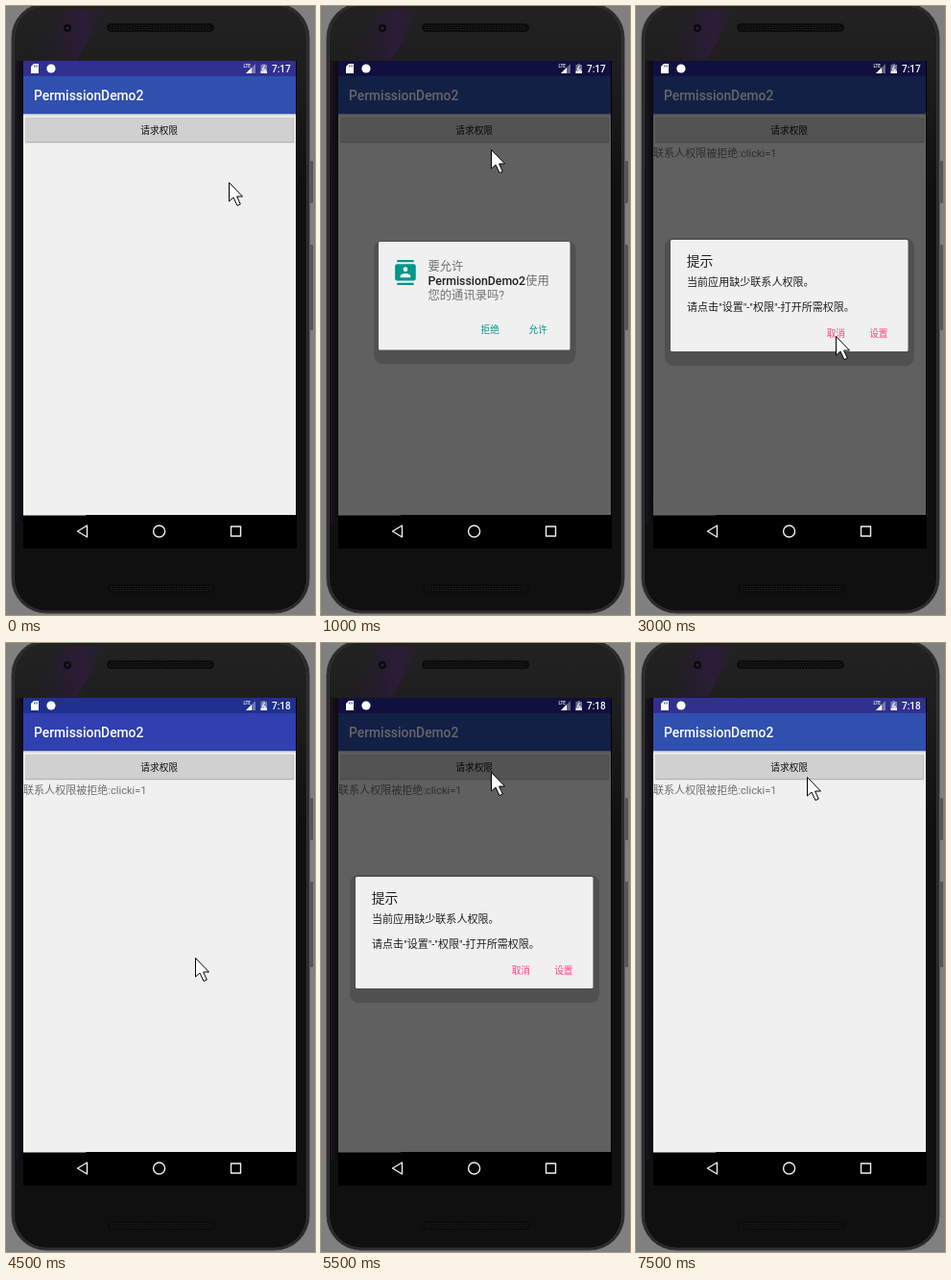
Write an HTML page that moves like this. It is 322 px wide and 633 px high and loops after 8000 ms.

```html
<!DOCTYPE html>
<html lang="zh-CN">
<head>
<meta charset="utf-8">
<style>
html, body { margin: 0; width: 100%; height: 100%; overflow: hidden; background: #808080; }
svg { display: block; width: 322px; height: 633px; }
text { font-family: Roboto, "Noto Sans CJK SC", "Noto Sans CJK", sans-serif; font-size: 11.06px; }
.small { font-size: 9.7px; }
.big { font-size: 13.85px; }
.medium { font-weight: 500; }
</style>
</head>
<body>
<svg viewBox="0 0 322 633">
  <defs>
    <linearGradient id="body" x2="0" y2="1">
      <stop offset="0" stop-color="#222"/>
      <stop offset=".1" stop-color="#1e1e1e"/>
      <stop offset=".3" stop-color="#101010"/>
      <stop offset="1" stop-color="#101010"/>
    </linearGradient>
    <linearGradient id="sheen">
      <stop offset="0" stop-color="#1a141e"/>
      <stop offset="1" stop-color="#0c0a10"/>
    </linearGradient>
    <linearGradient id="glare">
      <stop offset="0" stop-color="#241a2c" stop-opacity="0"/>
      <stop offset=".7" stop-color="#2c1c38"/>
      <stop offset="1" stop-color="#2c1c38" stop-opacity="0"/>
    </linearGradient>
    <g id="speaker">
      <rect width="112" height="9" rx="4.5" fill="#0c0c0c"/>
      <path d="M4 2.5H108M3 4.5H109M4 6.5H108" stroke="#262626" stroke-dasharray="1 2"/>
    </g>
  </defs>

  <!-- phone -->
  <rect x="317" y="161" width="3" height="44" rx="1" fill="#555"/>
  <rect x="317" y="248" width="3" height="89" rx="1" fill="#555"/>
  <rect x="6" y="-3" width="310" height="634" rx="36" fill="#262626" stroke="#383838"/>
  <rect x="8.5" y="-1" width="305" height="630" rx="34" fill="url(#body)" stroke="#3c3c3c" stroke-width=".8"/>
  <path d="M62 4H104L74 56H26Z" fill="url(#glare)"/>
  <rect x="10" y="57" width="8" height="480" fill="url(#sheen)"/>
  <circle cx="64" cy="23" r="4" fill="#0b0b0d"/>
  <circle cx="64" cy="23" r="1.5" fill="#2a2a34"/>
  <use href="#speaker" x="105" y="18"/>
  <use href="#speaker" x="106" y="601"/>

  <!-- app -->
  <rect x="18" y="57" width="285" height="507"/>
  <path d="M18 57H302V529H83V529.5H18Z" fill="#f0f0f0"/>
  <rect id="status" x="18" y="57" width="284" height="17"/>
  <rect id="bar" x="18" y="73" width="284" height="39"/>
  <path d="M18 112.5H302" stroke="#bbb"/>
  <path d="M18 113.5H302" stroke="#dcdcdc"/>
  <text x="29" y="98" class="big medium" fill="#fff">PermissionDemo2</text>
  <rect x="19" y="115" width="282" height="28" rx="2" fill="#e2e2e2"/>
  <rect x="20" y="116" width="280" height="26" rx="1.5" fill="#b4b4b4"/>
  <rect x="20" y="116" width="279.5" height="25" rx="1.5" fill="#d0d0d0"/>
  <text x="159.7" y="132.5" class="small" text-anchor="middle" fill="#101010">请求权限</text>
  <text id="result" x="18" y="157" fill="#707070">联系人权限被拒绝:clicki=1</text>
  <rect id="dim" x="18" y="57" width="284" height="473" fill-opacity=".6"/>

  <!-- status icons -->
  <path d="M29 60H34V70H26V63Z" fill="#fff"/>
  <path d="M29.5 61.5v2M31 61.5v2M32.5 61.5v2" stroke="#303090" stroke-width=".7"/>
  <circle cx="47" cy="65" r="4.6" fill="#fff"/>
  <path d="M250 70L260 60V70Z" fill="#fff" fill-opacity=".35"/>
  <path d="M250 70L256 64V70Z" fill="#fff"/>
  <text x="247.5" y="64" class="medium" fill="#fff" style="font-size:4.6px">LTE</text>
  <path d="M267.5 60H270V61H272V70H265.5V61H267.5Z" fill="#fff" fill-opacity=".4"/>
  <path d="M265.5 67.5H272V70H265.5Z" fill="#fff"/>
  <path d="M269.5 62L267 66H270.5L268 69.5" fill="none" stroke="#fff"/>
  <text id="clock" x="277" y="69" class="medium" fill="#fff" style="font-size:10px"></text>

  <!-- navigation -->
  <g fill="none" stroke="#f0f0f0" stroke-width="1.4" stroke-linejoin="round">
    <path d="M74.5 546L84.5 540V552Z"/>
    <circle cx="159.6" cy="546" r="6"/>
    <rect x="234.5" y="541" width="10" height="10"/>
  </g>

  <g id="ask">
    <rect x="55" y="244" width="210.5" height="128" rx="9" fill="#505050"/>
    <rect x="60" y="245" width="199.5" height="112.5" rx="1.5" fill="#f0f0f0"/>
    <g transform="translate(75 264) scale(1.08)">
      <path d="M4 0H20V2H4ZM4 22H20V24H4Z" fill="#009688"/>
      <rect x="2" y="4" width="20" height="16" rx="2" fill="#009688"/>
      <circle cx="12" cy="9" r="2.25" fill="#f0f0f0"/>
      <path d="M7 17V15.5C7 13.8 10.3 13 12 13S17 13.8 17 15.5V17Z" fill="#f0f0f0"/>
    </g>
    <g fill="#707070">
      <text x="111.5" y="275" style="font-size:12.3px">要允许</text>
      <text x="111.5" y="290" style="font-size:12.3px"><tspan class="medium" fill="#202020">PermissionDemo2</tspan>使用</text>
      <text x="111.5" y="304.5" style="font-size:12.3px">您的通讯录吗?</text>
    </g>
    <g fill="#009688">
      <text x="166.5" y="339.5" class="small">拒绝</text>
      <text x="216.5" y="339.5" class="small">允许</text>
    </g>
  </g>

  <g id="hint">
    <rect x="30" y="241" width="260" height="133" rx="9" fill="#505050"/>
    <rect x="36" y="243" width="247.5" height="116" rx="1.5" fill="#f0f0f0"/>
    <g fill="#202020">
      <text x="52.7" y="270" class="big">提示</text>
      <text x="53" y="291">当前应用缺少联系人权限。</text>
      <text x="53" y="317">请点击"设置"-"权限"-打开所需权限。</text>
    </g>
    <g fill="#ff4081">
      <text x="198.7" y="343.5" class="small">取消</text>
      <text x="243.2" y="343.5" class="small">设置</text>
    </g>
  </g>

  <path id="cursor" d="M.5 .5V20L5 16L9 24.5L12.3 23L8.6 15H14.5Z" fill="#fff" stroke="#000"/>
</svg>
<script>
const $ = id => document.getElementById(id);
const show = (id, on) => $(id).setAttribute("visibility", on ? "visible" : "hidden");

// start time, pointer x, pointer y, open dialog
const steps = [
  [0, 232, 183], [500, 180, 137],
  [1000, 177, 149, "ask"], [1500, 183, 320, "ask"], [2000, 184, 337, "ask"],
  [2500, 184, 337, "hint"], [3000, 208, 343, "hint"],
  [4500, 197, 327], [5000, 177, 134],
  [5500, 177, 134, "hint"], [6000, 174, 174, "hint"], [6500, 212, 345, "hint"],
  [7000, 203, 316], [7500, 178, 139]
];

function draw(now) {
  const t = now % 8000;
  const [, x, y, dialog] = steps.findLast(s => s[0] <= t);
  const cool = t >= 4500 && t < 5500;
  $("cursor").setAttribute("transform", `translate(${x} ${y})`);
  show("dim", dialog);
  show("ask", dialog === "ask");
  show("hint", dialog === "hint");
  show("result", t >= 2500);
  $("clock").textContent = t < 4500 ? "7:17" : "7:18";
  $("status").setAttribute("fill", cool ? "#203090" : dialog ? "#2828a0" : "#303090");
  $("bar").setAttribute("fill", cool ? "#3040b0" : "#3050b0");
  requestAnimationFrame(draw);
}
draw(0);
</script>
</body>
</html>
```
